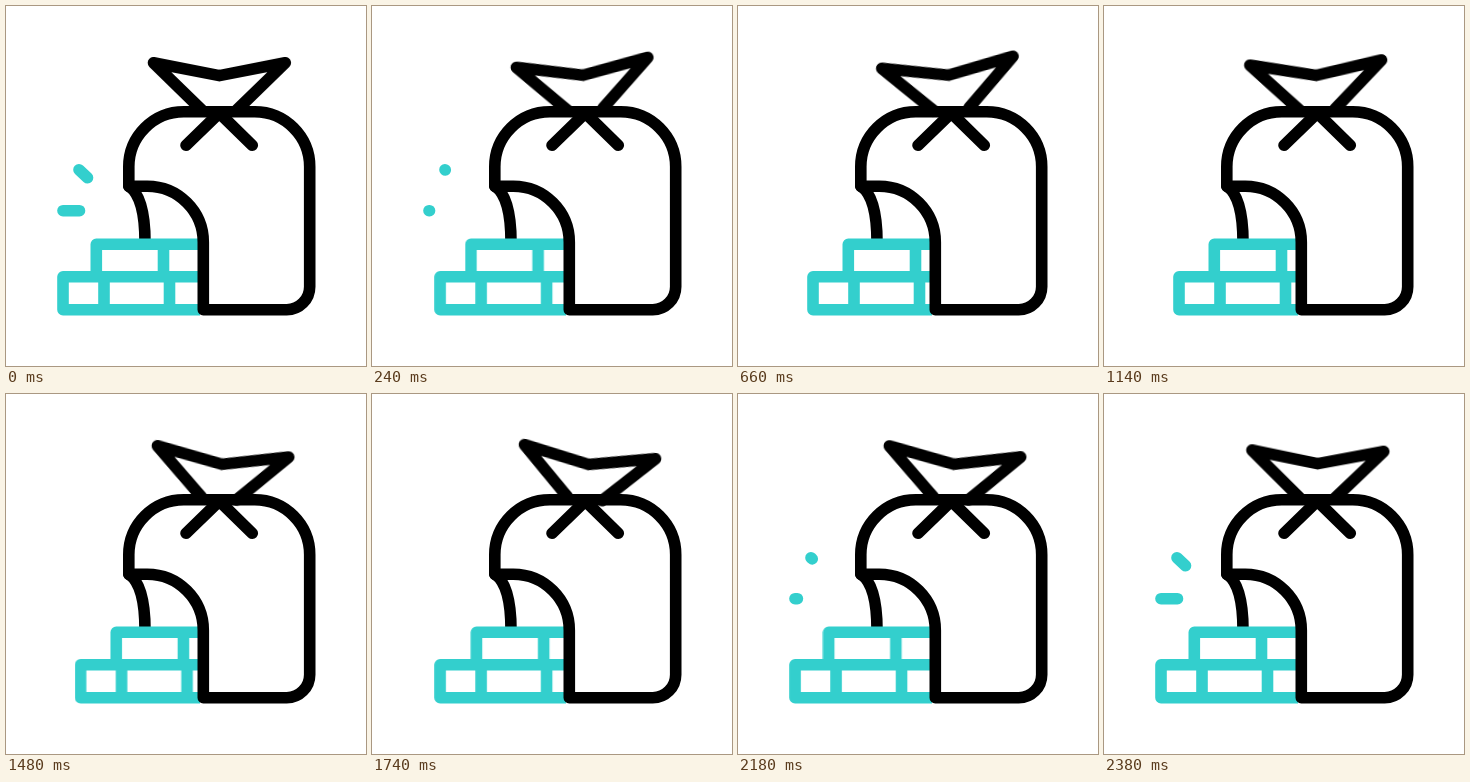
Recreate the animation shown at these times as an HTML page. Size 360 px wide and 360 px high, loop 2.4 s.

```html
<!DOCTYPE html>
<html lang="en">
<head>
<meta charset="utf-8">
<title>Rubble bag</title>
<style>
  html, body { margin: 0; width: 100%; height: 100%; overflow: hidden; background: #fff; }
  svg { display: block; width: 100vw; height: 100vh; }
  svg * { fill: none; stroke-width: 11.6; stroke-linejoin: round; }
  .ink { stroke: #000; stroke-linecap: round; }
  .teal { stroke: #33cfcd; }
  .dash { stroke-linecap: round; stroke-dasharray: 1 2; }
  #collar { transform-origin: 207px 100px; }
</style>
</head>
<body>
<svg viewBox="0 0 360 360">
  <clipPath id="outside"><rect x="0" y="0" width="194" height="360"/></clipPath>

  <path class="ink" d="M122.800 180C133 187 139 203 139 236"/>

  <g class="teal" clip-path="url(#outside)">
    <path id="upper" d="M230 238.300H90.300V270.800M157.500 238.300V270.800"/>
    <path id="lower" d="M230 270.800H57V303.700H230M98 270.800V303.700M163.500 270.800V303.700"/>
  </g>

  <g class="teal">
    <path class="dash" pathLength="1" d="M73 163.700L81.500 171.700"/>
    <path class="dash" pathLength="1" d="M57 204.700H73.500"/>
  </g>

  <g class="ink">
    <path d="M122.800 180.300V160.800A55 55 0 0 1 177.800 105.800H248.700A55 55 0 0 1 303.700 160.800V280.700A23 23 0 0 1 280.700 303.700H197.300V236.300A56 56 0 0 0 141.300 180.300Z"/>
    <path d="M180 139.300L213.300 107L246.300 139.300"/>
    <path id="collar" d="M195.800 104L147.500 56.800L213.400 69.600L279.300 56.800L230.800 104"/>
  </g>
</svg>
<script>
const LOOP = 2400;
const IN_OUT = 'cubic-bezier(.37,0,.63,1)';
const STRONG = 'cubic-bezier(.65,0,.35,1)';
const OUT = 'cubic-bezier(.165,.84,.44,1)';
const IN = 'cubic-bezier(.64,0,.78,.39)';

// Each step is [time in ms, value, easing towards the next step].
function play(el, prop, steps) {
  const keys = steps.map(([ms, value, easing = 'linear']) =>
    ({ offset: ms / LOOP, [prop]: value, easing }));
  el.animate(keys, { duration: LOOP, iterations: Infinity });
}

function slide(id, dx, lag) {
  const home = 'translateX(0px)', away = `translateX(${dx}px)`;
  play(document.getElementById(id), 'transform', [
    [0, home], [lag, home, IN_OUT], [420 + lag, away],
    [1400 + lag, away, IN_OUT], [2200 + lag, home], [LOOP, home],
  ]);
}

slide('lower', 18, 0);
slide('upper', 20, 50);

play(document.getElementById('collar'), 'transform', [
  [0, 'rotate(0deg)', OUT],
  [670, 'rotate(-5.3deg)', STRONG],
  [1830, 'rotate(6.2deg)', IN],
  [LOOP, 'rotate(0deg)'],
]);

for (const dash of document.querySelectorAll('.dash')) {
  play(dash, 'strokeDashoffset', [
    [0, 0, IN_OUT], [260, 0.98], [2120, 0.98, IN_OUT], [2380, 0], [LOOP, 0],
  ]);
  play(dash, 'opacity', [
    [0, 1], [260, 1], [260, 0], [2120, 0], [2120, 1], [LOOP, 1],
  ]);
}
</script>
</body>
</html>
```
